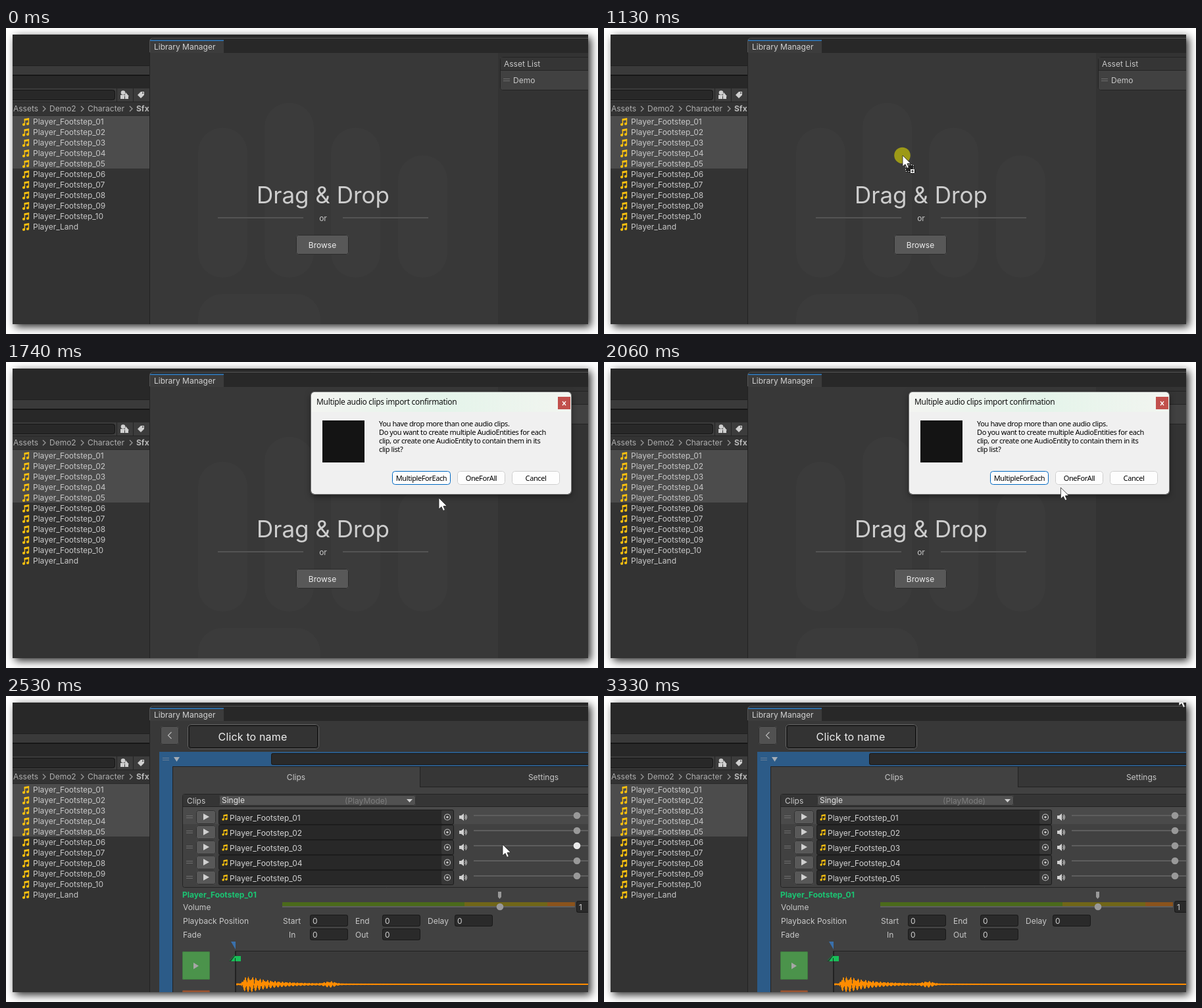
An HTML page with a canvas that plays this animation: 900 px wide and 466 px high, repeating every 3.4 s.

```html
<!DOCTYPE html>
<html>
<head>
<meta charset="utf-8">
<style>
html, body { margin: 0; width: 100%; height: 100%; overflow: hidden; background: #fff; }
canvas { display: block; }
</style>
</head>
<body>
<canvas id="stage" width="900" height="466"></canvas>
<script>
const ctx = document.getElementById('stage').getContext('2d');
const LOOP = 3400, STEPS = 51;
const UI = 'Inter, sans-serif', SYSTEM = '"Noto Sans", sans-serif';
const clips = [...Array(10)].map((_, i) => 'Player_Footstep_' + String(i + 1).padStart(2, '0'));

// Pointer keys: step, x, y
const path = [[2, 603, 381], [8, 143, 162], [10, 143, 162], [17, 454, 194], [19, 458, 196],
  [26, 658, 207], [33, 718, 181], [38, 755, 226], [43, 760, 224], [50, 874, -2]];

function rect(x, y, w, h, fill, stroke, r = 0) {
  ctx.beginPath();
  ctx.roundRect(x, y, w, h, r);
  if (fill) { ctx.fillStyle = fill; ctx.fill(); }
  if (stroke) {
    ctx.beginPath();
    ctx.roundRect(x + .5, y + .5, w - 1, h - 1, r);
    ctx.strokeStyle = stroke;
    ctx.lineWidth = 1;
    ctx.stroke();
  }
}

function disc(x, y, r, fill) {
  ctx.beginPath();
  ctx.arc(x, y, r, 0, 7);
  ctx.fillStyle = fill;
  ctx.fill();
}

function poly(points, fill) {
  ctx.beginPath();
  points.forEach(([x, y]) => ctx.lineTo(x, y));
  ctx.closePath();
  if (fill) { ctx.fillStyle = fill; ctx.fill(); }
}

function line(points, color, width = 1) {
  ctx.beginPath();
  points.forEach(([x, y]) => ctx.lineTo(x, y));
  ctx.strokeStyle = color;
  ctx.lineWidth = width;
  ctx.stroke();
}

function text(s, x, y, { color = '#c8c8c8', size = 12, weight = 400, align = 'left', family = UI, spacing = 0 } = {}) {
  ctx.font = `${weight} ${size}px ${family}`;
  ctx.letterSpacing = spacing + 'px';
  ctx.textAlign = align;
  ctx.fillStyle = color;
  ctx.fillText(s, x, y);
}

function at(x, y, scale, draw) {
  ctx.save();
  ctx.translate(x, y);
  ctx.scale(scale, scale);
  draw();
  ctx.restore();
}

function note(x, y, color, scale = 1) {
  at(x, y, scale, () => {
    disc(2, 10, 2.1, color);
    disc(8, 9, 2.1, color);
    rect(2.7, 1.5, 1.4, 8.5, color);
    rect(8.7, .5, 1.4, 8.5, color);
    poly([[2.7, 1.3], [10.1, 0], [10.1, 3], [2.7, 4.2]], color);
  });
}

function handle(x, y, color = '#707070') {
  rect(x, y - 2, 10, 1, color);
  rect(x, y + 1, 10, 1, color);
}

function field(x, y, w, h, value) {
  rect(x, y, w, h, '#2a2a2a', '#191919', 3);
  if (value) text(value, x + 4, y + h / 2 + 4.5, { color: '#d2d2d2' });
}

function projectPane(active) {
  rect(10, 10, 875, 441, '#333');
  rect(10, 10, 875, 48, '#282828');
  rect(10, 58, 209, 13, '#3a3a3a');
  rect(10, 57, 209, 1, '#202020');
  rect(10, 71, 209, 2, '#171717');
  rect(10, 73, 209, 19, '#282828');
  rect(10, 92, 209, 20, '#3c3c3c');
  rect(-10, 94, 176, 16, '#282828', '#161616', 4);
  [168, 193].forEach(x => rect(x, 92, 1, 20, '#242424'));
  rect(10, 112, 209, 1, '#242424');
  rect(10, 133, 209, 1, '#2a2a2a');

  disc(178, 98.5, 3.3, '#d0d0d0');
  poly([[182, 98], [187, 104], [180, 104]], '#d0d0d0');
  rect(174, 102, 6, 6, '#d0d0d0');
  rect(181, 104, 5, 4, '#d0d0d0');
  poly([[200, 102], [205, 97], [210, 97], [210, 102], [205, 107]], '#d0d0d0');
  disc(208, 99, 1, '#3c3c3c');

  [['Assets', 11], ['Demo2', 66], ['Character', 124]].forEach(([s, x]) => text(s, x, 127, { color: '#b0b0b0' }));
  text('Sfx', 198, 127, { color: '#b8b8b8', weight: 700 });
  [58, 116, 190].forEach(x => line([[x - 2, 119], [x + 2, 123], [x - 2, 127]], '#999', 1.3));

  rect(10, 134, 209, 80, active ? '#3e5f96' : '#4c4c4c');
  [...clips, 'Player_Land'].forEach((name, i) => {
    const lit = active && i < 5;
    note(25, 137 + 16 * i, lit ? '#fff' : '#fcc10f');
    text(name, 41, 147 + 16 * i, { color: lit ? '#fff' : '#c8c8c8' });
  });
}

function libraryWindow(focused) {
  rect(218, 15, 680, 450, '#383838', '#555', 5);
  rect(219, 16, 666, 22, '#282828', null, [5, 0, 0, 0]);
  rect(219, 18, 112, 20, '#3c3c3c', null, [4, 4, 0, 0]);
  if (focused) rect(219, 18, 112, 2, '#2f6ca3');
  text('Library Manager', 225, 33, { color: '#d2d2d2' });
  rect(218, 37, 1, 414, '#222');
}

function dropZone() {
  rect(748, 38, 137, 413, '#333');
  [[292, 152], [393, 114], [494, 152], [596, 194]].forEach(([x, y]) =>
    rect(x, y, 75, 380 - y, 'rgba(255,255,255,.017)', null, 37));
  rect(292, 405, 186, 100, 'rgba(255,255,255,.017)', null, 37);

  rect(751, 44, 150, 51, '#414141', '#242424', 3);
  rect(752, 45, 140, 19, '#353535');
  rect(752, 64, 140, 1, '#242424');
  text('Asset List', 757, 59);
  handle(756, 79);
  text('Demo', 771, 84);

  text('Drag & Drop', 482, 267, { size: 35, align: 'center', color: '#cdcdcd' });
  rect(322, 288, 130, 2, '#545454');
  rect(512, 288, 130, 2, '#545454');
  text('or', 482, 294, { align: 'center' });
  rect(441, 315, 80, 30, '#585858', '#2c2c2c', 3);
  text('Browse', 481, 335, { align: 'center', color: '#eee' });
}

function clipRow(i, pointer) {
  const y = 174 + 23 * i;
  handle(274, y + 10);
  rect(289, y, 30, 21, '#585858', '#303030', 3);
  poly([[300, y + 5], [309, y + 10], [300, y + 15]], '#d0d0d0');
  rect(323, y - 1, 358, 23, '#282828', '#1c1c1c', 3);
  note(328.5, y + 6, '#fcc10f', .8);
  text(clips[i], 340, y + 16, { color: '#d2d2d2' });
  rect(662, y, 18, 21, '#373737', null, 2);
  ctx.beginPath();
  ctx.arc(671, y + 10.5, 4.5, 0, 7);
  ctx.strokeStyle = '#c4c4c4';
  ctx.lineWidth = 1.2;
  ctx.stroke();
  disc(671, y + 10.5, 1.7, '#c4c4c4');

  poly([[689, y + 8], [692, y + 8], [696, y + 5], [696, y + 16], [692, y + 13], [689, y + 13]], '#d0d0d0');
  [3, 5].forEach(r => {
    ctx.beginPath();
    ctx.arc(695.5, y + 10.5, r, -.9, .9);
    ctx.strokeStyle = '#c0c0c0';
    ctx.stroke();
  });
  rect(711, y + 7, 174, 2, '#5e5e5e');
  const hover = pointer.x > 711 && Math.abs(pointer.y - y - 8) < 9;
  disc(868, y + 8, 5.3, hover ? '#eaeaea' : '#999');
}

function waveform() {
  rect(349, 388, 540, 63, '#3a3a3a');
  rect(349, 388, 540, 1, '#202020');
  rect(348, 388, 2, 63, '#222');
  ctx.fillStyle = '#ff8c00';
  for (let x = 350; x < 885; x++) {
    const decay = x < 358 ? .6 : 12 * Math.min(1, (x - 355) / 8) * Math.exp(-Math.max(0, x - 374) / 37);
    const amp = decay + 4 * Math.exp(-(((x - 492) / 10) ** 2));
    const beat = Math.abs(Math.sin(x * .55)) * .6 + Math.abs(Math.sin(x * 2.3)) * .4;
    const up = 1 + amp * beat * .9, down = 1 + amp * Math.abs(Math.sin(x * .55 + .5)) * .9;
    ctx.fillRect(x, 439 - up, 1, up + down);
  }
  poly([[342, 374], [349, 374], [349, 386]], '#3a70ab');
  poly([[339, 404], [347, 395], [349, 395], [349, 404]], '#203a2a');
  poly([[342, 404], [348, 396], [357, 396], [357, 404]], '#18bf58');
  line([[340, 403], [348, 394]], '#1a8c45');
  rect(348, 399, 1, 5, '#222');
}

function clipEditor(pointer) {
  rect(235, 46, 28, 28, '#515151', '#303030', 3);
  line([[251.5, 55], [246.5, 60], [251.5, 65]], '#b8b8b8', 1.2);
  rect(276, 43, 200, 38, '#1f1f1f', '#666', 4);
  rect(278, 45, 196, 34, '#333', '#191919', 3);
  text('Click to name', 375, 68, { size: 16, align: 'center', color: '#eee', spacing: .15 });

  rect(233, 85, 652, 366, '#2c5b88');
  handle(238, 96, '#6a8098');
  poly([[255, 93], [264, 93], [259.5, 100]], '#a5adb5');
  field(403, 87, 500, 18);
  rect(253, 107, 650, 350, '#414141', '#222');
  rect(630, 108, 255, 31, '#363636');
  rect(629, 107, 1, 32, '#222');
  rect(629, 138, 256, 1, '#222');
  text('Clips', 441, 128, { align: 'center' });
  text('Settings', 817, 128, { align: 'center' });

  rect(268, 149, 650, 143, '#414141', '#242424', 3);
  rect(269, 150, 616, 18, '#353535');
  rect(269, 168, 616, 1, '#242424');
  rect(269, 169, 616, 26, '#4a4a4a');
  text('Clips', 275, 164);
  rect(324, 151, 299, 16, '#515151', '#303030', 3);
  text('Single', 328, 163, { color: '#e4e4e4' });
  text('(PlayMode)', 580, 164, { align: 'right', color: '#7d7d7d' });
  poly([[609, 157], [618, 157], [613.5, 162]], '#d0d0d0');
  for (let i = 0; i < 5; i++) clipRow(i, pointer);

  text(clips[0], 268, 307, { weight: 700, color: '#1bc573' });
  text('Volume', 269, 326);
  rect(420, 314, 277, 6, '#4b6a1b');
  rect(697, 314, 126, 6, '#716618');
  rect(823, 314, 42, 6, '#8b531c');
  rect(420, 320, 445, 2, '#5e5e5e');
  poly([[748, 298], [753, 298], [753, 306], [750.5, 309], [748, 306]], '#999');
  disc(751, 321, 5.3, '#999');
  field(867, 312, 40, 18, '1');

  text('Playback Position', 269, 347);
  text('Fade', 269, 368);
  [['Start', 421, 333], ['End', 531, 333], ['Delay', 641, 333], ['In', 430, 354], ['Out', 531, 354]]
    .forEach(([label, x, y]) => {
      text(label, x, y + 14);
      field(label === 'In' ? 462 : x + 41, y, 58, 18, '0');
    });

  rect(268, 389, 42, 43, '#4b934b', '#3f7a3f', 2);
  poly([[285, 406], [293, 411], [285, 416]], '#a6a6a6');
  rect(268, 448, 42, 20, '#9a5533', '#804a30', 2);
  waveform();
}

function dialog() {
  ctx.save();
  ctx.shadowColor = 'rgba(0,0,0,.5)';
  ctx.shadowBlur = 10;
  ctx.shadowOffsetY = 3;
  rect(464, 46, 395, 155, '#f0f0f0', null, 5);
  ctx.restore();
  const bar = ctx.createLinearGradient(464, 0, 859, 0);
  bar.addColorStop(0, '#f3f4f1');
  bar.addColorStop(.5, '#e4f4ea');
  bar.addColorStop(1, '#f2f5f0');
  rect(464, 46, 395, 30, bar, null, [5, 5, 0, 0]);
  rect(463, 45, 397, 157, null, '#777', 5);
  text('Multiple audio clips import confirmation', 472, 65, { family: SYSTEM, color: '#111', spacing: -.33 });
  rect(839, 53, 19, 19, '#c1504c');
  line([[846, 60], [851, 66]], '#fff', 1.3);
  line([[851, 60], [846, 66]], '#fff', 1.3);
  rect(481, 89, 64, 64, '#141414');

  const small = { family: SYSTEM, size: 11, color: '#000', spacing: -.4 };
  ['You have drop more than one audio clips.',
    'Do you want to create multiple AudioEntities for each',
    'clip, or create one AudioEntity to contain them in its',
    'clip list?'].forEach((s, i) => text(s, 567, 98 + 13 * i, small));
  [['MultipleForEach', 587, 89], ['OneForAll', 686, 73], ['Cancel', 769, 73]].forEach(([s, x, w], i) => {
    rect(x, 166, w, 21, '#fdfdfd', i ? '#cfcfcf' : '#0067c0', 4);
    text(s, x + w / 2, 181, { ...small, align: 'center' });
  });
}

function cursor({ x, y }, pressed, dragging) {
  if (pressed) disc(x - .5, y, 12.3, 'rgba(190,185,12,.75)');
  at(x, y, 1, () => {
    if (dragging) {
      rect(4, 14, 14, 12, '#222');
      ctx.setLineDash([2, 2]);
      rect(4, 14, 13, 11, null, '#ddd');
      ctx.setLineDash([]);
      rect(11, 20, 8, 8, '#fff', '#111');
      rect(13, 23.5, 4, 1, '#111');
      rect(14.5, 22, 1, 4, '#111');
    }
    poly([[0, 0], [0, 17], [4, 13.5], [6.7, 19.5], [9.4, 18.3], [6.9, 12.6], [12.2, 12.2]], '#fff');
    ctx.strokeStyle = '#222';
    ctx.lineWidth = .8;
    ctx.stroke();
  });
}

function pointerAt(step) {
  const i = Math.max(0, path.findIndex(([s]) => s >= step) - 1);
  const [s0, x0, y0] = path[i], [s1, x1, y1] = path[i + 1];
  const u = Math.min(1, Math.max(0, (step - s0) / (s1 - s0)));
  const e = u * u * (3 - 2 * u);
  return { x: x0 + (x1 - x0) * e, y: y0 + (y1 - y0) * e };
}

function draw(now) {
  const step = Math.floor((now % LOOP + 5) * STEPS / LOOP) % STEPS;
  const pointer = pointerAt(step);
  const picked = step >= 10 && step < 15;
  const pressed = step >= 10 && step < 19;

  ctx.fillStyle = '#fff';
  ctx.fillRect(0, 0, 900, 466);
  ctx.save();
  ctx.shadowColor = 'rgba(0,0,0,.85)';
  ctx.shadowBlur = 12;
  ctx.shadowOffsetX = ctx.shadowOffsetY = 4;
  rect(10, 10, 875, 441, '#333');
  ctx.restore();

  ctx.save();
  ctx.beginPath();
  ctx.rect(10, 10, 875, 441);
  ctx.clip();
  projectPane(picked);
  libraryWindow(!picked);
  if (step >= 36) clipEditor(pointer);
  else dropZone();
  if (step >= 21 && step < 33) dialog();
  if (step >= 2) cursor(pointer, pressed, pressed && pointer.x > 219);
  ctx.restore();
}

function tick() {
  draw(performance.now());
  requestAnimationFrame(tick);
}
tick();
</script>
</body>
</html>
```
